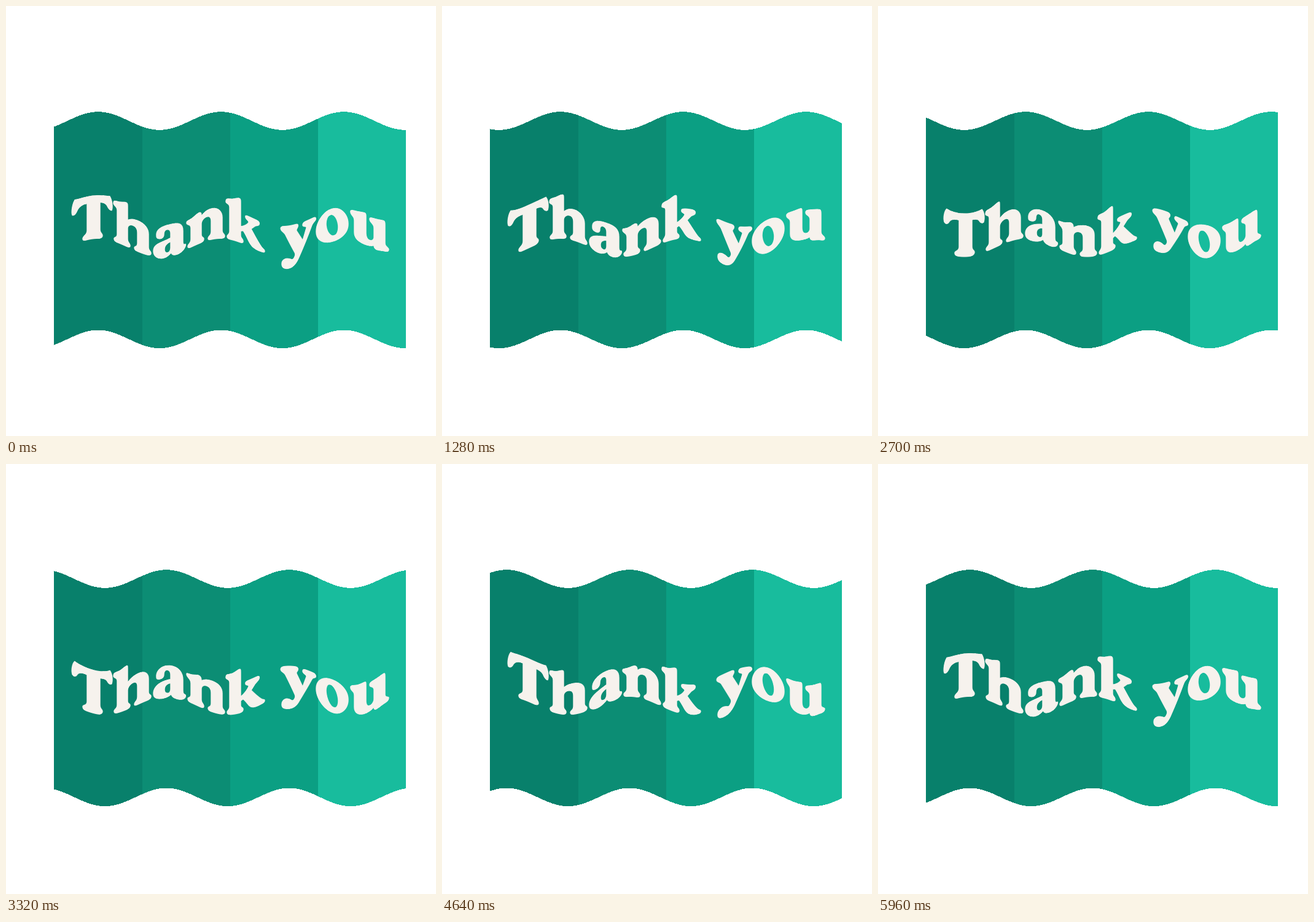
An HTML page with a canvas that plays this animation: 700 by 700 pixels, repeating every 5.98 s.

```html
<!DOCTYPE html>
<html lang="en">
<head>
<meta charset="utf-8">
<title>Thank you</title>
<style>
html, body { margin: 0; width: 100%; height: 100%; overflow: hidden; background: #fff; }
canvas { display: block; }
</style>
</head>
<body>
<canvas id="stage" width="700" height="700" role="img" aria-label="Thank you"></canvas>
<script>
const SIZE = 700, LOOP = 5980, STEP = 20;
const LEFT = 78, RIGHT = 651, TOP = 187, BOTTOM = 542.3;
const AMPLITUDE = 14.8, WAVELENGTH = 200, CREST = 150;
const BANDS = ['#08806b', '#0c8d74', '#0b9f83', '#18bc9d'];
const INK = '#f6f2ed';

// Arch, two legs and feet shared by "h" and "n"
const arch = 'c5-5 11-7 17-7c11 0 17 7 17 16v21c0 6 4 5 4 9c0 3-3 4-7 4h-15c-3 0-5-1-5-3' +
  'c0-4 5-3 5-10v-17c0-7-3-9-7-9c-5 0-9 4-9 9v17c0 6 4 5 4 9c0 3-2 4-6 4h-15c-4 0-5-2-5-4c0-3 5-3 5-9';

const letters = {
  T: 'M108 344C106 338 108 326 112 321C120 324 160 324 169 322C173 328 174 338 172 344' +
    'C170 345 167 343 165 339C163 335 158 334 153 334V378C153 385 157 384 157 388C157 391 154 393 150 393' +
    'H130C126 393 125 391 125 389C125 385 132 385 132 378V334C124 333 119 335 116 340C114 344 111 347 108 344Z',
  h: 'M175 332C175 326 178 327 184 326C189 325 193 322 196 322C198 322 198 324 198 327V350' + arch +
    'V341C181 335 176 336 175 332Z',
  a: 'M245 360C244 350 252 343 267 343C281 343 288 349 288 361V378C288 384 290 384 292 384' +
    'C294 387 289 395 279 395C273 395 270 393 269 389C264 394 259 396 253 396C245 396 240 392 240 385' +
    'C240 373 253 369 268 365V358C268 353 266 350 262 350C259 350 257 353 257 357C257 362 254 364 250 364' +
    'C247 364 245 363 245 360ZM268 371C260 373 258 378 258 382C258 386 260 388 263 388C266 388 268 385 268 381Z',
  n: 'M294 350C294 347 297 348 302 347C307 346 311 343 314 343C317 343 318 345 318 350' + arch +
    'V362C301 354 294 355 294 350Z',
  k: 'M358 333C358 327 361 328 367 327C372 326 377 322 380 322C382 322 382 324 382 328V367' +
    'C388 364 393 359 395 355C396 352 391 352 390 349C389 345 392 345 396 345H407C412 345 413 347 412 350' +
    'C411 353 408 353 405 356L399 363C404 370 411 380 416 385C419 388 421 387 421 390C421 393 416 393 411 393' +
    'C403 393 399 391 395 385C392 380 389 375 386 372L382 374V381C382 386 386 385 386 389C386 392 384 393 380 393' +
    'H365C361 393 360 391 360 389C360 386 364 386 364 380V341C364 335 358 336 358 333Z',
  y: 'M448 350C446 346 448 344 453 344H471C475 344 476 346 475 349C474 352 472 352 473 355L483 374L489 356' +
    'C490 352 483 353 483 349C483 346 485 345 488 345H500C504 345 505 348 504 350C502 353 500 352 498 356' +
    'C491 372 484 386 476 401C471 410 465 413 459 413C452 413 449 410 449 405C449 399 454 396 459 397' +
    'C464 398 465 401 468 399C470 397 472 393 470 389L455 358C453 354 450 353 448 350Z',
  o: 'M505 369a26 26.5 0 1 0 52 0a26 26.5 0 1 0-52 0ZM527.3 351.4a9 18-12 1 0 7.4 35.2a9 18-12 1 0-7.4-35.2Z',
  u: 'M561 350C560 346 563 346 568 346C575 346 582 344 584 344C586 344 586 346 586 350V375' +
    'C586 381 588 385 592 385C596 385 599 381 599 377V362C599 355 592 356 592 351C592 347 596 347 601 346' +
    'C607 345 612 343 615 343C617 343 617 346 617 350V378C617 384 622 383 623 386C623 390 620 391 615 392' +
    'C610 393 606 395 603 395C600 395 599 393 599 390C594 394 588 395 583 395C573 395 567 390 567 381V362' +
    'C567 355 562 355 561 350Z'
};

// Flat lettering at double resolution, sliced into columns while waving
function drawLettering() {
  const sheet = document.createElement('canvas');
  sheet.width = sheet.height = SIZE * 2;
  const pen = sheet.getContext('2d');
  pen.scale(2, 2);
  pen.fillStyle = pen.strokeStyle = INK;
  pen.lineWidth = 1.4;
  pen.lineJoin = 'round';
  for (const outline of Object.values(letters)) {
    const path = new Path2D(outline);
    pen.fill(path, 'evenodd');
    pen.stroke(path);
  }
  return sheet;
}

const lettering = drawLettering();
const ctx = document.getElementById('stage').getContext('2d');

function draw(time) {
  const t = Math.floor(time % LOOP / STEP) * STEP;
  const crest = CREST + WAVELENGTH * t / LOOP;
  ctx.clearRect(0, 0, SIZE, SIZE);
  for (let x = LEFT; x < RIGHT; x++) {
    const dy = -AMPLITUDE * Math.cos(2 * Math.PI * (x + 0.5 - crest) / WAVELENGTH);
    const top = Math.round(TOP + dy);
    ctx.fillStyle = BANDS[Math.floor((x - LEFT) / (RIGHT - LEFT) * BANDS.length)];
    ctx.fillRect(x, top, 1, Math.round(BOTTOM + dy) - top);
    ctx.drawImage(lettering, x * 2, 600, 2, 260, x, 300 + dy, 1, 130);
  }
}

const start = performance.now();
function tick() {
  draw(performance.now() - start);
  requestAnimationFrame(tick);
}
tick();
</script>
</body>
</html>
```
